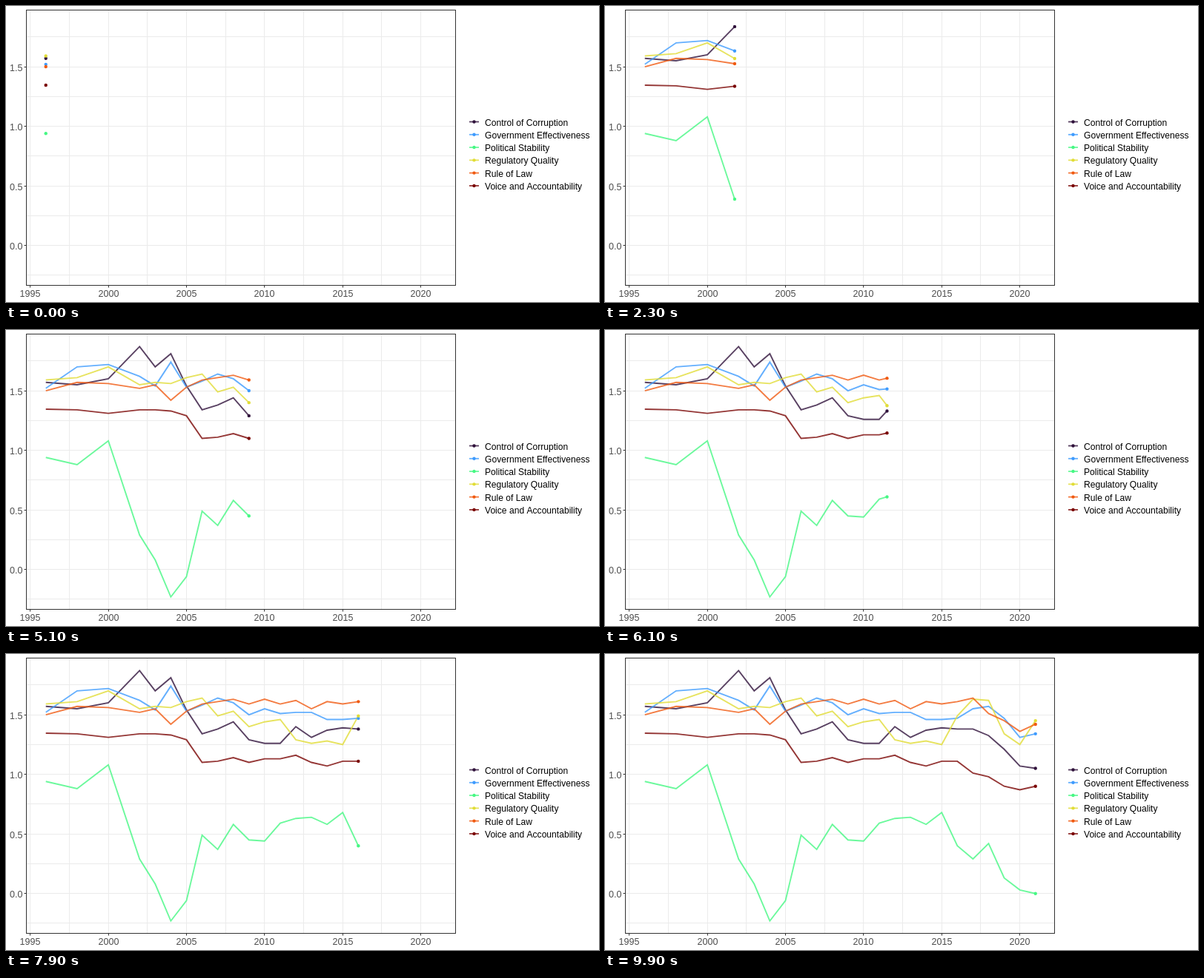
An HTML page with a canvas that plays this animation: 800 by 400 pixels, repeating every 10000 ms.

```html
<!DOCTYPE html>
<html lang="en">
<head>
<meta charset="utf-8">
<title>Governance indicators</title>
<style>
  html, body { margin: 0; width: 800px; height: 400px; overflow: hidden; background: #fff; }
  canvas { display: block; }
</style>
</head>
<body>
<canvas id="chart" width="800" height="400"></canvas>
<script>
const ctx = document.getElementById('chart').getContext('2d');
const STEPS = 100, STEP_MS = 100, FIRST = 1996, LAST = 2021;
const LEFT = 27.5, RIGHT = 606.5, TOP = 5.5, BOTTOM = 377.5;

// Values in hundredths: every second year to 2002, then yearly.
const series = [
  ['Control of Corruption', '#30123B',
    [157, 155, 160, 187, 170, 181, 154, 134, 138, 144, 129, 126, 126, 140, 131, 137, 139, 138, 138, 132.5, 121, 107, 105]],
  ['Government Effectiveness', '#3E9BFE',
    [152, 170, 172, 162, 154, 174, 153, 158, 164, 160, 150, 155, 151, 152, 152, 146, 146, 147, 155, 157, 147, 131, 134]],
  ['Political Stability', '#46F884',
    [94, 88, 108, 29, 8, -23, -6, 49, 37, 58, 45, 44, 59, 63, 64, 58, 68, 40, 29, 42, 13, 3, 0]],
  ['Regulatory Quality', '#E1DD37',
    [159, 161, 170, 155, 157, 156, 161, 164, 149, 153, 140, 144, 146, 129, 126, 128, 125, 149, 163, 162, 134, 125, 145]],
  ['Rule of Law', '#F05B12',
    [150, 157, 156, 152, 155, 142, 153, 159, 161, 163, 159, 163, 159, 162, 155, 161, 159, 161, 164, 151, 145, 136, 142]],
  ['Voice and Accountability', '#7A0403',
    [134.5, 134, 131, 134, 134, 133, 129, 110, 111, 114, 110, 113, 113, 116, 110, 107, 111, 111, 101, 98, 90, 87, 90]]
];

const years = series[0][2].map((_, i) => i < 4 ? FIRST + 2 * i : 1999 + i);
// Each year is reached on a whole step.
const keys = years.map(y => Math.round((STEPS - 1) * (y - FIRST) / (LAST - FIRST)));

const px = year => 32.65 + 21.08 * (year - 1995);
const py = value => 323.7 - 161.1 * value;
const crisp = v => Math.floor(v) + 0.5;

function line(points, color, width, alpha = 1) {
  ctx.globalAlpha = alpha;
  ctx.strokeStyle = color;
  ctx.lineWidth = width;
  ctx.beginPath();
  points.forEach(([x, y]) => ctx.lineTo(x, y));
  ctx.stroke();
  ctx.globalAlpha = 1;
}

function dot([x, y], color) {
  ctx.fillStyle = color;
  ctx.beginPath();
  ctx.arc(x, y, 2.2, 0, 2 * Math.PI);
  ctx.fill();
}

function text(str, x, y, size, color, align) {
  ctx.font = `${size}px "Liberation Sans", Arial, sans-serif`;
  ctx.fillStyle = color;
  ctx.textAlign = align;
  ctx.fillText(str, x, y);
}

function drawAxes() {
  for (let year = 1995; year <= 2020; year += 2.5) {
    const x = crisp(px(year));
    line([[x, TOP], [x, BOTTOM]], '#EBEBEB', 1);
    if (year % 5) continue;
    line([[x, BOTTOM], [x, BOTTOM + 3]], '#333', 1);
    text(year, x, 393, 12.5, '#4D4D4D', 'center');
  }
  for (let value = -0.25; value <= 1.75; value += 0.25) {
    const y = crisp(py(value));
    line([[LEFT, y], [RIGHT, y]], '#EBEBEB', 1);
    if (value % 0.5) continue;
    line([[LEFT - 3, y], [LEFT, y]], '#333', 1);
    text(value.toFixed(1), 22.5, y + 5, 12.5, '#4D4D4D', 'right');
  }
}

function drawLegend() {
  series.forEach(([name, color], i) => {
    const y = 156.5 + 17.28 * i;
    line([[625, y], [638, y]], color, 1.8, 0.8);
    dot([631.5, y], color);
    text(name, 646, y + 5, 12.1, '#000', 'left');
  });
}

// Visible part of a series, ending at the moving head.
function trace(values, step) {
  const points = [];
  for (let i = 0; i < keys.length && keys[i] <= step; i++) {
    points.push([px(years[i]), py(values[i] / 100)]);
  }
  const b = points.length, a = b - 1;
  if (b < keys.length && step > keys[a]) {
    const k = (step - keys[a]) / (keys[b] - keys[a]);
    const mix = list => list[a] + (list[b] - list[a]) * k;
    points.push([px(mix(years)), py(mix(values) / 100)]);
  }
  return points;
}

function draw(now) {
  const step = Math.floor(now / STEP_MS) % STEPS;
  ctx.fillStyle = '#fff';
  ctx.fillRect(0, 0, 800, 400);
  drawAxes();
  const traces = series.map(s => trace(s[2], step));
  traces.forEach((points, i) => line(points, series[i][1], 1.9, 0.8));
  traces.forEach((points, i) => dot(points[points.length - 1], series[i][1]));
  ctx.strokeStyle = '#333';
  ctx.lineWidth = 1;
  ctx.strokeRect(LEFT, TOP, RIGHT - LEFT, BOTTOM - TOP);
  drawLegend();
}

const start = performance.now();
function tick() {
  draw(performance.now() - start);
  requestAnimationFrame(tick);
}
tick();
</script>
</body>
</html>
```
